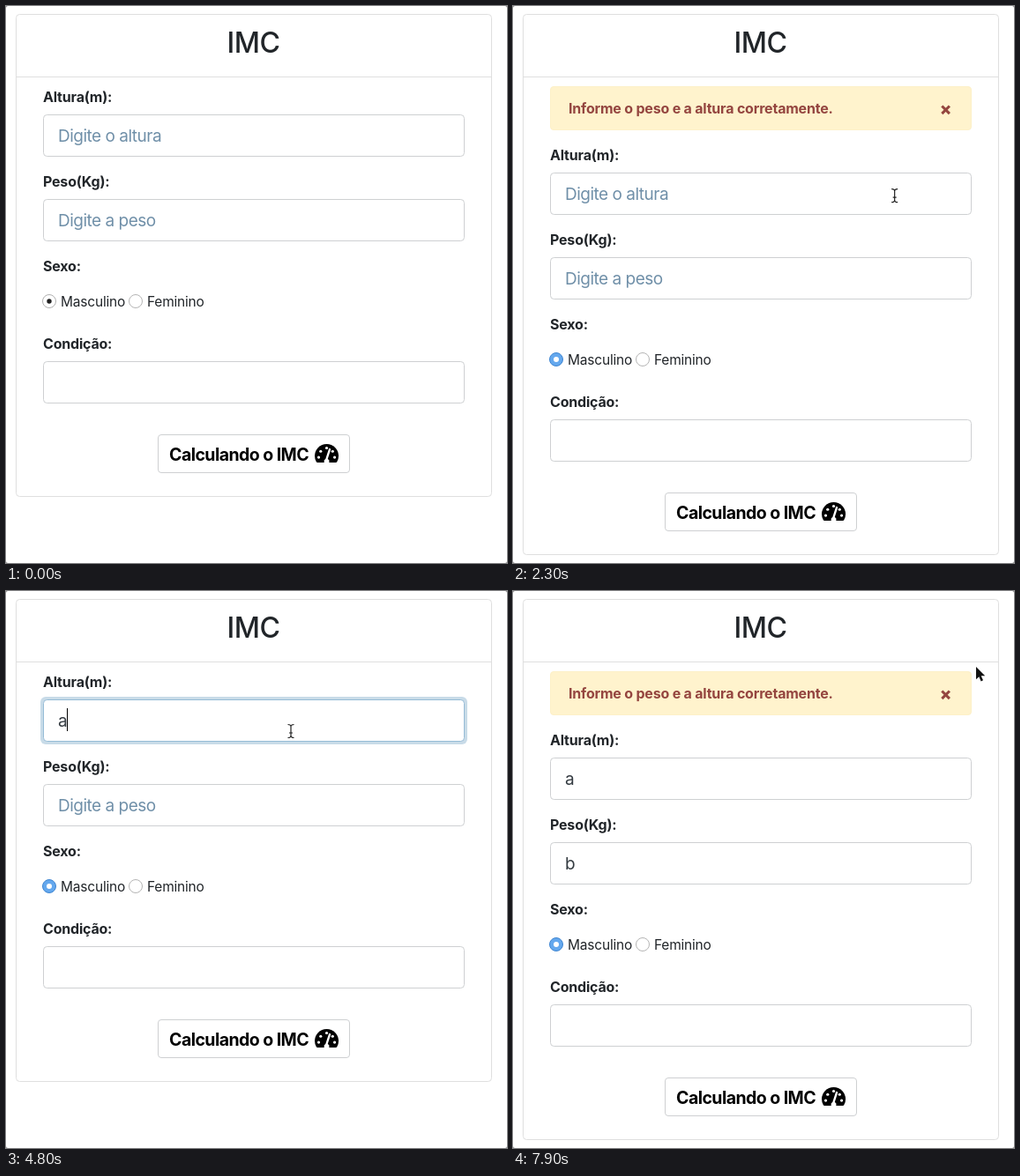
These frames come from a looping animation (568x632 px, 8 s). An HTML page:

```html
<!DOCTYPE html>
<html lang="pt">
<head>
<meta charset="utf-8">
<title>IMC</title>
<style>
  html, body { margin: 0; width: 100%; height: 100%; overflow: hidden; background: #fff; }
  svg { display: block; width: 568px; height: 632px; }
  text { font-family: Inter, Roboto, sans-serif; fill: #212529; white-space: pre; }
  .title { font-size: 32px; font-weight: 500; letter-spacing: -.5px; text-anchor: middle; }
  .label { font-size: 16px; font-weight: 700; letter-spacing: -.2px; }
  .option { font-size: 15.5px; letter-spacing: -.2px; }
  .value { font-size: 19px; letter-spacing: -.5px; }
  .action { font-size: 19.5px; font-weight: 700; letter-spacing: -.55px; fill: #000; }
  .box { fill: #fff; stroke: #ced0d2; }
  .card { fill: #fff; stroke: #dfdfdf; }
  .ring { fill: #c8dbe8; }
</style>
</head>
<body>
<svg viewBox="0 0 568 632">
  <rect width="568" height="632" fill="#8a8a8a"/>
  <rect width="568" height="632" rx="2.5" fill="#fff"/>
  <rect id="card" class="card" x="11.5" y="9.5" width="539" height="547" rx="4"/>
  <path d="M12 80.5H550" stroke="#dfdfdf"/>
  <text class="title" x="280.5" y="53">IMC</text>

  <g id="alert">
    <rect x="42.5" y="91.5" width="477" height="49" rx="3.5" fill="#fff3cd" stroke="#fdf0c8"/>
    <text class="label" x="63" y="122" style="fill:#94453f">Informe o peso e a altura corretamente.</text>
    <path id="close" d="M486.3 113.5l8.6 8.6m0-8.6l-8.6 8.6" stroke-width="3.1"/>
  </g>

  <g id="form">
    <text class="label" x="42" y="109">Altura(m):</text>
    <g id="height"></g>
    <text class="label" x="42" y="205">Peso(Kg):</text>
    <g id="weight"></g>
    <text class="label" x="42" y="301">Sexo:</text>
    <circle id="radio" cx="49" cy="335" r="7.5"/>
    <circle id="dot" cx="49" cy="335"/>
    <text class="option" x="62" y="341">Masculino</text>
    <circle cx="147" cy="335" r="7.5" fill="#fff" stroke="#b5b5b5"/>
    <text class="option" x="160" y="341">Feminino</text>
    <text class="label" x="42" y="389">Condição:</text>
    <rect class="box" x="42.5" y="403.5" width="477" height="47" rx="4"/>
    <rect class="box" x="172.5" y="486.5" width="217" height="43" rx="3.5"/>
    <text class="action" x="185" y="516">Calculando o IMC</text>
    <g transform="translate(350 495.5) scale(.047)" fill="#fff">
      <path fill="#000" d="M0 320A288 288 0 0 1 576 320Q576 400 537 465Q528 480 510 480H66Q48 480 39 465Q0 400 0 320Z"/>
      <g id="gaugeDots"></g>
      <path d="M288 390L362 160" stroke="#fff" stroke-width="50" stroke-linecap="round"/>
      <path d="M230 480A64 64 0 1 1 346 480Z"/>
    </g>
  </g>

  <path id="arrow" d="M0 0V14.2L3.3 11.2 5.6 16.4 8 15.3 5.7 10.3H10.2Z" fill="#111" stroke="#fff" stroke-width="1" paint-order="stroke"/>
  <path id="beam" d="M-3.5-7.5Q0-7.5 0-5Q0-7.5 3.5-7.5M0-5V5M-3.5 7.5Q0 7.5 0 5Q0 7.5 3.5 7.5M-2 2H2" fill="none" stroke="#222" stroke-width="1.2"/>
</svg>
<script>
const LOOP = 8000, STEP = 100, SHIFT = 66;
const $ = id => document.getElementById(id);
const show = (el, on) => el.setAttribute('visibility', on ? 'inherit' : 'hidden');
const set = (el, attrs) => Object.entries(attrs).forEach(([k, v]) => el.setAttribute(k, v));

// Pointer path: time, x, y
const path = [
  [300, 538, 540], [900, 286, 510], [1500, 286, 510], [2700, 484, 112],
  [3100, 484, 114], [3300, 484, 114], [4000, 323, 156], [4800, 323, 159],
  [5100, 323, 159], [5500, 318, 245], [5900, 318, 245], [6500, 277, 488],
  [7000, 277, 488], [7900, 525, 86]
];

const fields = [
  { id: 'height', top: 123, hint: 'Digite o altura', text: 'a', focus: 4300, typed: 4700, blur: 5500, advance: 10 },
  { id: 'weight', top: 219, hint: 'Digite a peso', text: 'b', focus: 5500, typed: 5800, blur: 7000, advance: 11 }
];

for (const f of fields) {
  $(f.id).innerHTML = `
    <rect class="ring" x="39" y="${f.top - 3}" width="484" height="54" rx="6"/>
    <rect class="box" x="42.5" y="${f.top + .5}" width="477" height="47" rx="4"/>
    <text class="value" x="59" y="${f.top + 31}"></text>
    <path stroke="#000"/>`;
  [f.ring, f.box, f.label, f.caret] = $(f.id).children;
}

$('gaugeDots').innerHTML = [[96, 352], [144, 208], [288, 128], [432, 208], [480, 352]]
  .map(([x, y]) => `<circle cx="${x}" cy="${y}" r="34"/>`).join('');

function pointerAt(t) {
  const i = path.findIndex(p => p[0] > t);
  if (i < 0) return path.at(-1).slice(1);
  if (i === 0) return path[0].slice(1);
  const [t0, x0, y0] = path[i - 1], [t1, x1, y1] = path[i];
  const u = (t - t0) / (t1 - t0), e = u * u * (3 - 2 * u);
  return [x0 + (x1 - x0) * e, y0 + (y1 - y0) * e];
}

function drawField(f, t) {
  const focused = t >= f.focus && t < f.blur, typed = t >= f.typed;
  const glow = focused ? Math.min(1, (t - f.focus + STEP) / 200) : 0;
  f.ring.setAttribute('opacity', glow);
  f.box.style.stroke = focused ? '#96bcd6' : '';
  f.label.textContent = typed ? f.text : f.hint;
  f.label.style.fill = typed ? '#333a40' : '#6f8fa8';
  const caretX = 59.5 + (typed ? f.advance : 0);
  f.caret.setAttribute('d', `M${caretX} ${f.top + 10}v26`);
  const since = t - (typed ? f.typed : f.focus);
  show(f.caret, focused && since % 1000 < 500);
}

function render(time) {
  const t = Math.floor(time % LOOP / STEP) * STEP;
  const alerted = (t >= 1100 && t < 3300) || t >= 7000;
  const shift = alerted ? SHIFT : 0;
  const active = t >= 900;
  const [x, y] = pointerAt(t);

  show($('alert'), alerted);
  $('card').setAttribute('height', 547 + shift);
  $('form').setAttribute('transform', `translate(0 ${shift})`);
  fields.forEach(f => drawField(f, t));

  set($('radio'), active
    ? { fill: '#64a8ee', stroke: '#3f86d2' }
    : { fill: '#fff', stroke: '#b0b0b0' });
  set($('dot'), active ? { r: 3, fill: '#fff' } : { r: 2.7, fill: '#222' });

  const overClose = Math.abs(x - 490) < 10 && Math.abs(y - 117) < 13;
  $('close').setAttribute('stroke', overClose ? '#151515' : '#94453f');

  const overInput = x > 42 && x < 520 &&
    fields.some(f => y > f.top + shift && y < f.top + shift + 48);
  for (const id of ['arrow', 'beam']) {
    $(id).setAttribute('transform', `translate(${x} ${y})`);
    show($(id), t >= 300 && overInput === (id === 'beam'));
  }
}

const start = performance.now();
function tick() {
  render(performance.now() - start);
  requestAnimationFrame(tick);
}
tick();
</script>
</body>
</html>
```
